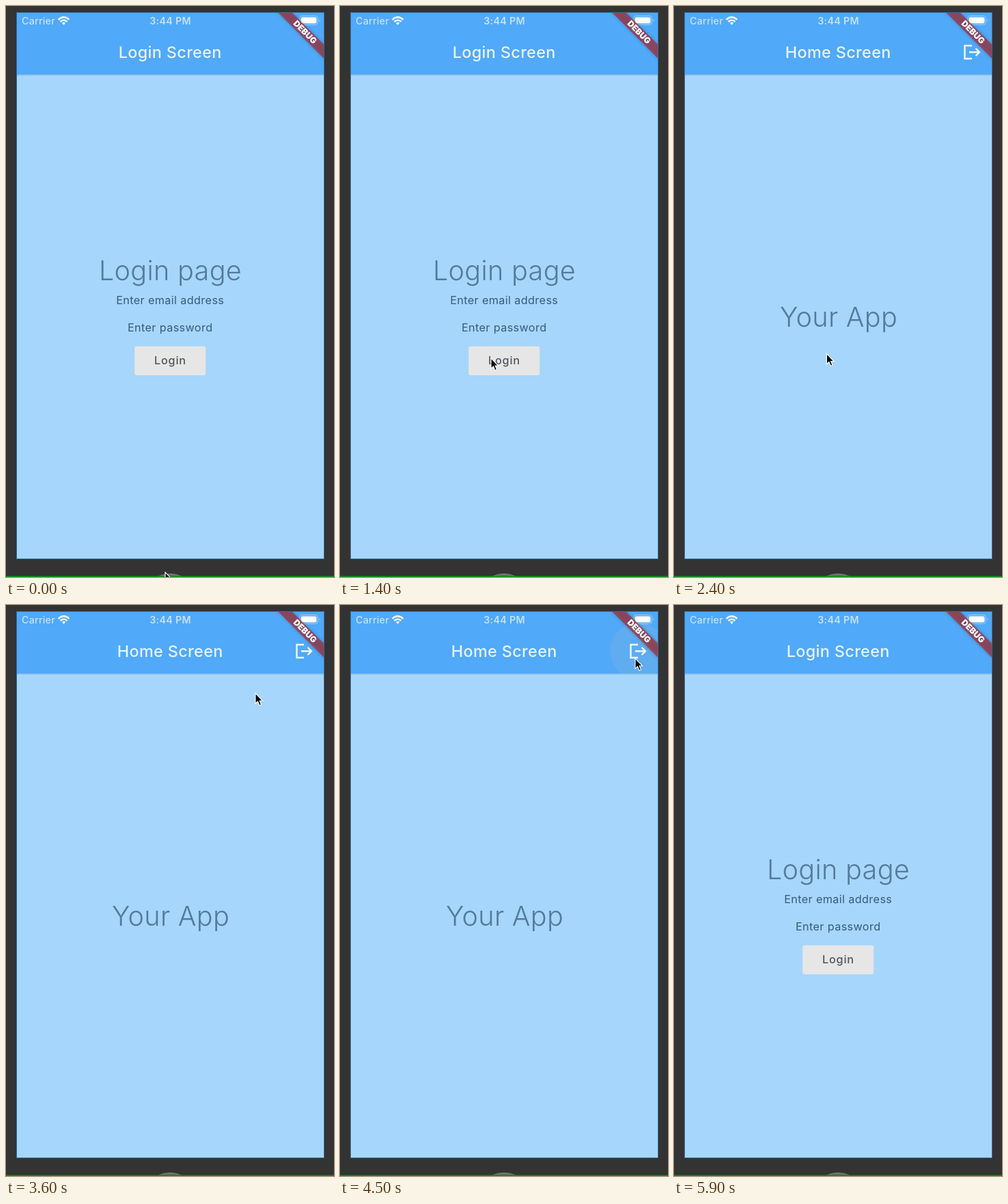
Recreate the animation shown at these times as an HTML page. Size 480 by 835 pixels, loop 6000 ms.

```html
<!DOCTYPE html>
<html lang="en">
<head>
<meta charset="utf-8">
<title>Login flow</title>
<style>
html, body { margin: 0; width: 100%; height: 100%; overflow: hidden; background: #333; }
svg { display: block; width: 480px; height: 835px; font-family: Inter, Roboto, sans-serif; }
.title { font-size: 23.4px; font-weight: 500; letter-spacing: .35px; fill: #e9f4ff; }
.big { font-size: 39.6px; font-weight: 350; letter-spacing: .3px; fill: #54799f; }
.label { font-size: 16.2px; letter-spacing: .38px; fill: #375a82; }
.action { font-size: 16.2px; font-weight: 500; letter-spacing: .85px; fill: #50565c; }
.mid { text-anchor: middle; }
.status { font-size: 14.2px; font-weight: 500; letter-spacing: .25px; fill: #c6e2fc; }
.clock { font-weight: 600; letter-spacing: .35px; }
.debug { font-size: 12.2px; font-weight: 900; fill: #fff; }
</style>
</head>
<body>
<svg viewBox="0 0 480 835">
  <defs>
    <clipPath id="screen"><rect x="15" y="9" width="451" height="800"/></clipPath>
    <clipPath id="bar"><rect x="15" y="9" width="451" height="91"/></clipPath>
    <linearGradient id="edge">
      <stop offset="0" stop-color="#1d5c95" stop-opacity="0"/>
      <stop offset="1" stop-color="#1d5c95" stop-opacity=".4"/>
    </linearGradient>
    <filter id="soft" x="-20%" y="-80%" width="140%" height="260%"><feGaussianBlur stdDeviation="2.5"/></filter>
    <g id="base">
      <rect x="15" y="9" width="451" height="800" fill="#a6d6fb"/>
      <rect x="15" y="9" width="451" height="91.5" fill="#50a9f9"/>
      <rect x="15" y="100" width="451" height="1.5" fill="#86b9e2"/>
    </g>
  </defs>
  <rect width="480" height="835" fill="#333"/>
  <circle cx="240" cy="872" r="41.5" fill="#6c6c6c" stroke="#858585"/>
  <rect y="833.4" width="480" height="1.6" fill="#088c12"/>

  <g clip-path="url(#screen)">
    <g id="pages">
      <g id="login">
        <rect x="7" y="9" width="8" height="95" fill="url(#edge)"/>
        <use href="#base"/>
        <text class="title mid" x="240.2" y="76">Login Screen</text>
        <text class="big mid" x="240.5" y="401">Login page</text>
        <text class="label mid" x="240.2" y="436">Enter email address</text>
        <text class="label mid" x="240.2" y="475.5">Enter password</text>
        <rect id="button" x="188.2" y="497.8" width="104" height="42.2" rx="2.4" fill="#e6e6e6"/>
        <path id="rim" d="M294.5 507V544M282 542.5H294.5" fill="none" stroke="#82abd0"/>
        <text class="action mid" x="240.4" y="524">Login</text>
      </g>
      <g id="home">
        <rect x="7" y="9" width="8" height="95" fill="url(#edge)"/>
        <use href="#base"/>
        <text class="title mid" x="240.2" y="76">Home Screen</text>
        <text class="big mid" x="241" y="469">Your App</text>
        <g clip-path="url(#bar)"><circle id="ripple" cx="436" cy="67" fill="#bcbcbc"/></g>
        <path d="M436 58H425.5V77H436M432 67.5H446M441.5 62L447 67.5L441.5 73" fill="none" stroke="#f1f8ff" stroke-width="2.4"/>
      </g>
    </g>

    <text class="status" x="23" y="27">Carrier</text>
    <text class="status clock mid" x="240.5" y="27">3:44 PM</text>
    <g fill="none" stroke="#eef7ff" stroke-width="2.5">
      <path d="M76.5 20Q84.5 12.8 92.5 20M79.4 23Q84.5 18.6 89.6 23"/>
      <path d="M81.8 24.8Q84.5 22.8 87.2 24.8L84.5 28Z" fill="#eef7ff" stroke="none"/>
    </g>
    <rect x="429.5" y="14.5" width="27" height="13" rx="4" fill="none" stroke="#9dcffb"/>
    <rect x="431.5" y="16.5" width="23" height="9" rx="2.5" fill="#fff"/>
    <path d="M458.5 19Q461 21 458.5 23Z" fill="#9dcffb"/>
    <g transform="translate(465.5 9) rotate(45)">
      <rect x="-50" y="33.6" width="100" height="14.4" fill="#000" opacity=".22" filter="url(#soft)"/>
      <rect x="-50" y="33.6" width="100" height="14.4" fill="#b71c1c" fill-opacity=".6"/>
      <text class="debug mid" x="1" y="44.6">DEBUG</text>
    </g>
    <rect x="15.5" y="9.5" width="450" height="799" fill="none" stroke="#3a6a92"/>
  </g>
  <path id="cursor" d="M0 0V15.2L3.5 12L5.9 17.8L8.5 16.7L6.1 11H10.6Z" fill="#000" stroke="#fff" stroke-width="1.1"/>
</svg>
<script>
const LOOP = 6000, TICK = 100, SLIDE = 400, WIDTH = 450;
const TO_HOME = 1711, TO_LOGIN = 4511, TAP = 4150;
const $ = id => document.getElementById(id);
const pages = $('pages'), login = $('login'), home = $('home');

// time, x, y of the pointer tip
const route = [
  [0, 233, 828], [700, 143, 570], [1300, 221, 515], [2300, 221, 515],
  [3600, 365, 129], [4200, 432, 78], [4600, 432, 78], [5000, 427, 109],
  [5400, 488, 158], [6000, 488, 158]
];

const clamp = v => Math.max(0, Math.min(1, v));
const bez = (u, a, b) => 3 * u * (1 - u) ** 2 * a + 3 * u * u * (1 - u) * b + u ** 3;

function easeOut(x) {
  if (x <= 0 || x >= 1) return clamp(x);
  let lo = 0, hi = 1;
  for (let i = 0; i < 20; i++) {
    const u = (lo + hi) / 2;
    if (bez(u, .35, .33) < x) lo = u; else hi = u;
  }
  return bez(lo, .91, .97);
}

function pointer(t) {
  const i = route.findIndex((p, k) => k > 0 && t < p[0]);
  const [t0, x0, y0] = route[i - 1], [t1, x1, y1] = route[i];
  const k = (t - t0) / (t1 - t0), s = k * k * (3 - 2 * k);
  return [x0 + (x1 - x0) * s, y0 + (y1 - y0) * s];
}

const move = (el, x, y = 0) => el.setAttribute('transform', `translate(${x} ${y})`);
const show = (el, on) => el.setAttribute('display', on ? 'inline' : 'none');

function slide(under, over, p) {
  if (pages.lastElementChild !== over) pages.append(over);
  show(under, p < 1);
  show(over, p > 0);
  move(under, -WIDTH / 3 * p);
  move(over, WIDTH * (1 - p));
}

function draw(t) {
  if (t < TO_LOGIN) slide(login, home, easeOut((t - TO_HOME) / SLIDE));
  else slide(home, login, easeOut((t - TO_LOGIN) / SLIDE));

  const leaving = t > TO_HOME && t < TO_LOGIN;
  show($('button'), !leaving);
  show($('rim'), leaving);

  $('ripple').setAttribute('r', 41 * clamp((t - TAP) / 150));
  $('ripple').setAttribute('opacity', .22 * clamp((4700 - t) / 300));
  move($('cursor'), ...pointer(t));
}

function frame() {
  const t = performance.now() % LOOP;
  draw(Math.floor(t / TICK) * TICK);
  requestAnimationFrame(frame);
}
frame();
</script>
</body>
</html>
```
